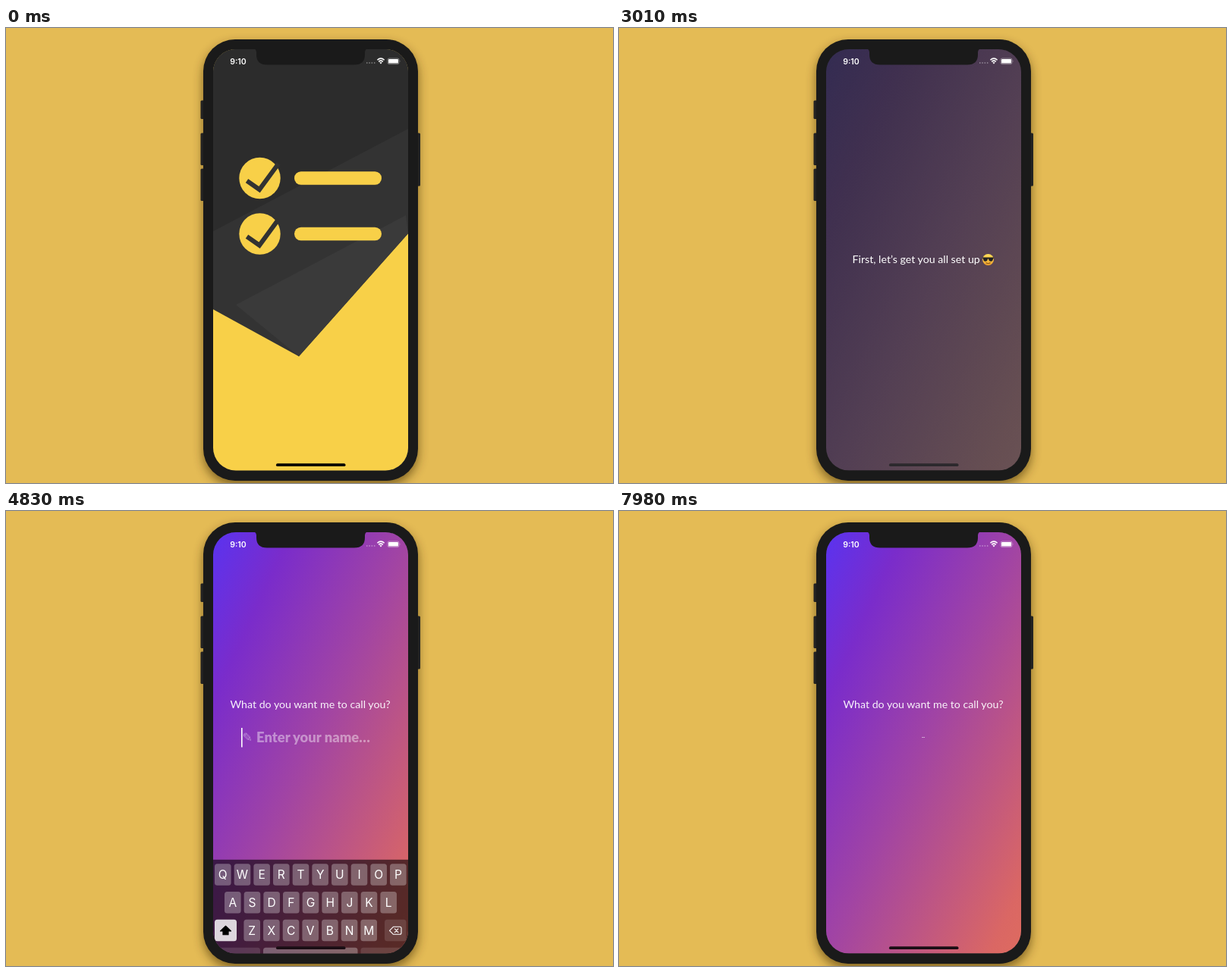
An HTML page for the animation above (8 s loop, 800 by 600 pixels).

```html
<!DOCTYPE html>
<html lang="en">
<head>
<meta charset="utf-8">
<title>Onboarding</title>
<style>
  html, body { margin: 0; width: 100%; height: 100%; overflow: hidden; background: #e4bb55; }
  svg { display: block; width: 100vw; height: 100vh; }
  text { fill: #fff; }
  .copy { font: 400 14.2px Lato, sans-serif; }
  .bold { font: 900 18.4px Lato, sans-serif; }
  .ui { font-family: Inter, sans-serif; text-anchor: middle; }
</style>
</head>
<body>
<svg viewBox="0 0 800 600">
  <defs>
    <linearGradient id="dark" x1="0" y1="0" x2="1" y2="1">
      <stop offset="0" stop-color="#2a2a2a"/>
      <stop offset=".25" stop-color="#323232"/>
      <stop offset=".55" stop-color="#3e3d41"/>
      <stop offset="1" stop-color="#4c4b51"/>
    </linearGradient>
    <linearGradient id="vivid" x1="0" y1="0" x2="1" y2="1">
      <stop offset="0" stop-color="#5a33f0"/>
      <stop offset=".2" stop-color="#7a2ccb"/>
      <stop offset=".5" stop-color="#a144a4"/>
      <stop offset=".92" stop-color="#da6764"/>
      <stop offset="1" stop-color="#de6b5f"/>
    </linearGradient>
    <linearGradient id="face" x1="0" y1="0" x2="0" y2="1">
      <stop offset="0" stop-color="#ffe05a"/>
      <stop offset="1" stop-color="#eea02c"/>
    </linearGradient>
    <filter id="blur" x="-20%" y="-20%" width="140%" height="140%">
      <feGaussianBlur stdDeviation="7"/>
    </filter>
    <clipPath id="screen"><rect x="273" y="28" width="257" height="555.5" rx="30"/></clipPath>
  </defs>

  <rect width="800" height="600" fill="#e4bb55"/>
  <rect x="260" y="21" width="283" height="582" rx="42" fill="#3a2800" opacity=".6" filter="url(#blur)"/>
  <g fill="#222">
    <rect x="256.5" y="95.5" width="6" height="24.5" rx="1.5"/>
    <rect x="256.5" y="138.5" width="6" height="42.5" rx="1.5"/>
    <rect x="256.5" y="185.5" width="6" height="42.5" rx="1.5"/>
    <rect x="540" y="138.5" width="6" height="70" rx="1.5"/>
  </g>
  <rect x="260" y="15" width="283" height="582" rx="42" fill="#1a1a1a"/>

  <g clip-path="url(#screen)">
    <rect x="273" y="28" width="257" height="555.5" fill="url(#dark)"/>
    <rect id="color" x="273" y="28" width="257" height="555.5" fill="url(#vivid)"/>

    <g id="splash">
      <rect x="273" y="28" width="257" height="556" fill="#f8d048"/>
      <path d="M273 28H530V271L386 433L273 371Z" fill="#333"/>
      <path d="M273 28H530V133L273 268Z" fill="#2c2c2c"/>
      <path d="M303 365L527 247L530 271L386 433Z" fill="#3a3a3a"/>
      <g id="items" fill="#f8d048"></g>
    </g>

    <g id="title">
      <g transform="translate(349 233)" stroke-linecap="round" fill="none">
        <path d="M-12 -3Q-12 -10 -5 -12M-9 8Q-5 12 0 12" stroke="#262628" stroke-width="2"/>
        <path d="M-9 3L1 7M-10 -3L2 4M-7 -9L5 2M-1 -10L7 0" stroke="#e2b596" stroke-width="4.6"/>
        <path d="M-9 2.5L1 6.5M-10 -3.5L2 3.5M-7 -9.5L5 1.5M-1 -10.5L7 -.5" stroke="#f6dcc6" stroke-width="3.6"/>
        <path d="M-1 5Q0 -2 7 -2Q10 -5 9.500 -8Q11 -10 12 -6Q14 2 11 8Q6 14 1 9Z" fill="#f3d5bd" stroke="#f3d5bd"/>
        <path d="M2 6Q3 1 8 1" stroke="#dfb191" stroke-width=".8"/>
      </g>
      <text x="365.300" y="242" class="bold" style="font-size:25.7px">Hi there</text>
    </g>

    <g id="intro">
      <text x="307.500" y="310" class="copy">First, let’s get you all set up</text>
      <g transform="translate(486.500 305.500)">
        <circle r="7.500" fill="url(#face)"/>
        <path d="M-7.300 -3H7.300V-1.500L6.500 -1Q6 2.300 3.700 2.300Q1 2.300 .6 -1H-.6Q-1 2.300 -3.700 2.300Q-6 2.300 -6.500 -1L-7.300 -1.500Z" fill="#222"/>
        <path d="M-3 4.200Q0 6 3 4.200" stroke="#7a4510" fill="none"/>
      </g>
    </g>

    <text id="ask" x="401" y="259.700" class="copy" text-anchor="middle">What do you want me to call you?</text>

    <g id="field">
      <g id="hint" opacity=".42">
        <text x="311.500" y="303.500" style="font:16px 'DejaVu Sans',sans-serif">✎</text>
        <text x="330" y="304.500" class="bold">Enter your name…</text>
      </g>
      <text id="name" x="401" y="304.500" class="bold" text-anchor="middle"></text>
      <rect id="caret" y="286" width="1.600" height="25.500" fill="#fff"/>
    </g>

    <g id="keyboard">
      <rect x="273" y="384.500" width="257" height="200" fill="#000" opacity=".6"/>
      <g id="keys"></g>
      <path id="shift" d="M289.500 472L296.500 478.700H293V483.500H286V478.700H282.500Z" stroke-width="1.200" stroke-linejoin="round"/>
      <g fill="none" stroke="#fff" stroke-width="1.100" stroke-linejoin="round" stroke-linecap="round">
        <path d="M510.500 473H519Q521 473 521 475V481Q521 483 519 483H510.500L505.500 478Z"/>
        <path d="M512.300 475.700L516.900 480.300M516.900 475.700L512.300 480.300"/>
        <path d="M497.800 555V557Q497.800 561.500 502.500 561.500Q507.200 561.500 507.200 557V555M502.500 561.500V564.500M499.500 564.700H505.500"/>
      </g>
      <rect x="499.700" y="547.500" width="5.600" height="12" rx="2.800" fill="#fff"/>
      <circle cx="300" cy="556" r="9" fill="#f7f0f5"/>
      <g fill="#3d1c42">
        <circle cx="296.700" cy="553" r="1.300"/>
        <circle cx="303.300" cy="553" r="1.300"/>
        <path d="M294 557H306Q305 562.500 300 562.500Q295 562.500 294 557Z"/>
      </g>
    </g>

    <rect id="home" x="356" y="574.300" width="91.500" height="3.700" rx="1.850"/>
    <text x="306" y="47.500" class="ui" font-size="10.500" font-weight="600">9:10</text>
    <g fill="#fff">
      <path d="M475 46h1.500m1.800 0h1.500m1.800 0h1.500m1.800 0h1.500" stroke="#fff" stroke-width="1.500" opacity=".42"/>
      <path d="M489.400 42.300Q494 38 498.600 42.300M491.200 44.400Q494 41.900 496.800 44.400" fill="none" stroke="#fff" stroke-width="1.500"/>
      <path d="M492.300 45.600Q494 44.300 495.700 45.600L494 47.400Z"/>
      <rect x="503" y="40" width="15" height="7.600" rx="2" fill="none" stroke="#fff" stroke-width=".6" opacity=".6"/>
      <rect x="504" y="41" width="13" height="5.600" rx="1.200"/>
      <path d="M518.900 42.500q1 1.300 0 2.600z" opacity=".6"/>
    </g>
  </g>
  <path d="M325 27Q330 27.500 330 32V35Q330 48.500 344 48.500H459Q473 48.500 473 35V32Q473 27.500 478 27Z" fill="#1a1a1a"/>
</svg>

<script>
const LOOP = 8000;
const NAME = 'Vilo';
const TYPED = [5500, 5880, 6220, 6600];
const HEIGHT = 198.5;

const $ = id => document.getElementById(id);
const clamp = u => Math.min(1, Math.max(0, u));
const span = (t, start, length) => clamp((t - start) / length);
const easeOut = u => 1 - (1 - u) ** 3;
const mix = (a, b, u) => a.map((v, i) => Math.round(v + (b[i] - v) * u));

function add(parent, tag, attrs, text) {
  const el = document.createElementNS('http://www.w3.org/2000/svg', tag);
  for (const k in attrs) el.setAttribute(k, attrs[k]);
  if (text) el.textContent = text;
  parent.appendChild(el);
  return el;
}

function place(id, opacity, dy) {
  $(id).setAttribute('opacity', opacity);
  $(id).setAttribute('transform', `translate(0 ${dy})`);
}

for (const y of [198, 271.5]) {
  add($('items'), 'circle', { cx: 334.5, cy: y, r: 27.2 });
  add($('items'), 'path', {
    d: `M317.5 ${y + 3.5}L334 ${y + 15}L359 ${y - 19}`,
    fill: 'none', stroke: '#323232', 'stroke-width': 6
  });
  add($('items'), 'rect', { x: 380, y: y - 8.7, width: 115, height: 17.4, rx: 8.7 });
}

const letters = [];
function addKey(x, y, width, opacity) {
  return add($('keys'), 'rect', { x, y, width, height: 28.5, rx: 3.5, fill: '#fff', 'fill-opacity': opacity });
}

[['qwertyuiop', 275], ['asdfghjkl', 288], ['zxcvbnm', 313.4]].forEach(([row, left], r) => {
  [...row].forEach((ch, i) => {
    const x = left + i * 25.67, y = 390 + r * 36.8;
    addKey(x, y, 21.6, .29);
    letters.push({ ch, y, el: add($('keys'), 'text', { x: x + 10.8, class: 'ui' }) });
  });
});
const shiftKey = addKey(275, 463.6, 29, .12);
addKey(499, 463.6, 28.5, .12);
[['123', 275, 60, .12], ['space', 339, 124.5, .29], ['Continue', 467.5, 60, .12]].forEach(([label, x, w, o]) => {
  addKey(x, 500.5, w, o);
  add($('keys'), 'text', { x: x + w / 2, y: 518.5, class: 'ui', 'font-size': 10.6 }, label);
});

let upper = null;
function setCase(on) {
  if (on === upper) return;
  upper = on;
  for (const { ch, y, el } of letters) {
    el.textContent = on ? ch.toUpperCase() : ch;
    el.setAttribute('y', y + (on ? 20.2 : 19));
    el.setAttribute('font-size', on ? 15.5 : 17);
  }
  shiftKey.setAttribute('fill-opacity', on ? .82 : .12);
  $('shift').setAttribute('fill', on ? '#000' : 'none');
  $('shift').setAttribute('stroke', on ? '#000' : '#fff');
}

function draw(t) {
  const splashOut = span(t, 70, 400);
  const vivid = span(t, 2850, 800);
  $('splash').setAttribute('opacity', 1 - splashOut);
  $('color').setAttribute('opacity', vivid);

  const titleIn = easeOut(span(t, 630, 600)), titleOut = span(t, 2450, 450);
  place('title', titleIn * (1 - titleOut), -20 * (1 - titleIn) - 20 * titleOut);

  const introIn = easeOut(span(t, 870, 600)), introOut = span(t, 3060, 500);
  place('intro', introIn * (1 - introOut), 22 * (1 - introIn) + 23 * introOut);

  const askIn = easeOut(span(t, 3500, 480));
  place('ask', askIn * .94, -20 * (1 - askIn));

  const grow = 1 - (1 - span(t, 3720, 490)) ** 2;
  const size = grow * (1 - span(t, 7560, 475));
  $('field').setAttribute('transform', `translate(401 298.5) scale(${size}) translate(-401 -298.5)`);

  const count = TYPED.filter(at => t >= at).length;
  $('name').textContent = NAME.slice(0, count);
  $('hint').setAttribute('visibility', count ? 'hidden' : 'visible');

  const focused = t >= 4690 && t < 7350;
  const since = t - Math.max(4690, ...TYPED.slice(0, count));
  $('caret').setAttribute('x', count ? 401 + $('name').getComputedTextLength() / 2 : 310);
  $('caret').setAttribute('opacity', focused && since % 1000 < 560 ? 1 : 0);

  const shown = easeOut(span(t, 4715, 420)) * (1 - easeOut(span(t, 7350, 420)));
  $('keyboard').setAttribute('transform', `translate(0 ${HEIGHT * (1 - shown)})`);
  $('keyboard').setAttribute('visibility', shown > 0 ? 'visible' : 'hidden');
  setCase(count === 0);

  let bar = mix([0, 0, 0], [48, 48, 51], splashOut);
  bar = mix(bar, [26, 14, 20], vivid);
  bar = mix(bar, [80, 72, 73], span(shown, .7, .3));
  $('home').setAttribute('fill', `rgb(${bar})`);
}

function tick() {
  draw(performance.now() % LOOP);
  requestAnimationFrame(tick);
}
tick();
</script>
</body>
</html>
```
